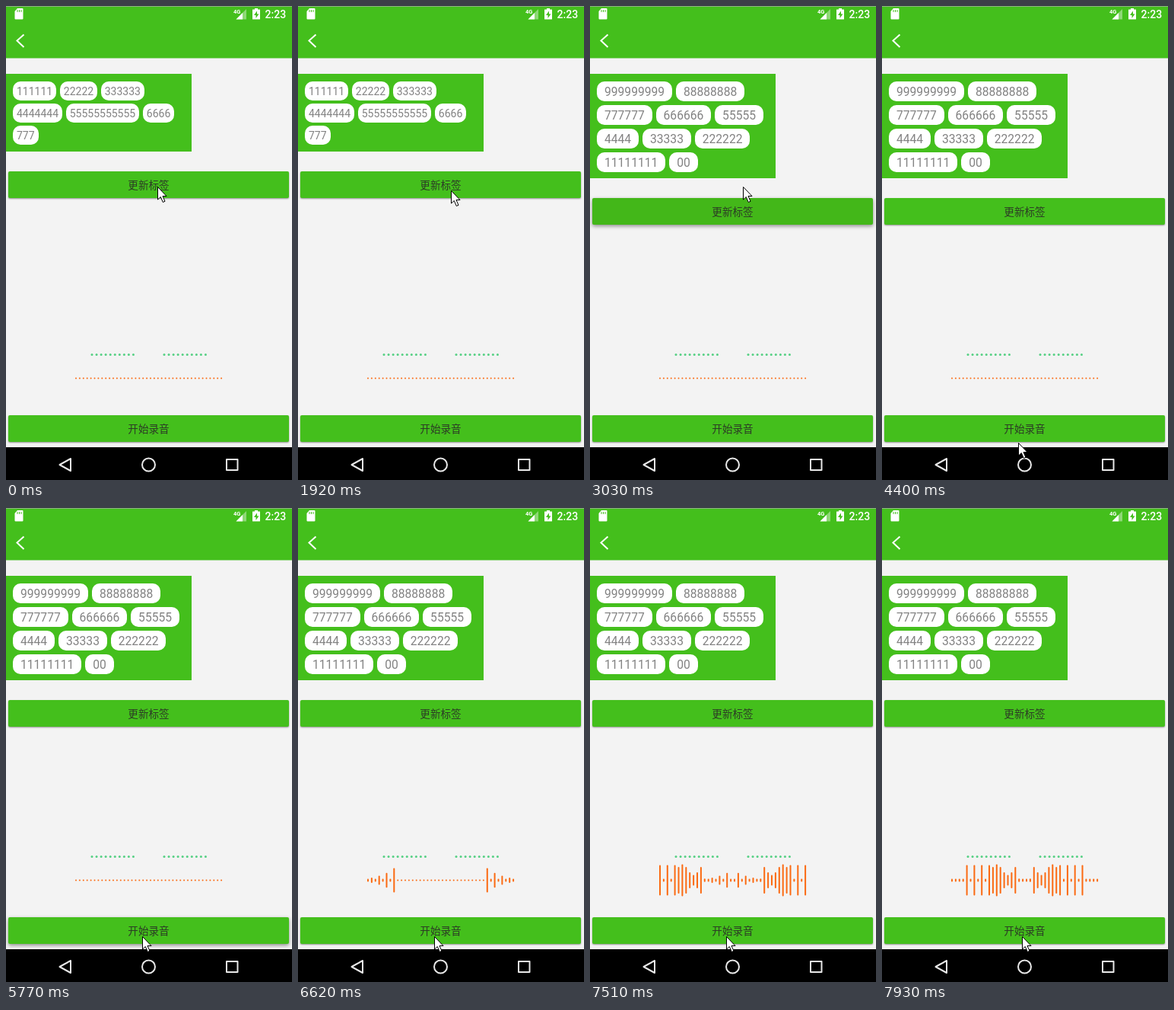
Animation, 376 px wide and 622 px high, one loop 7.99 s. Source, as an HTML page:

```html
<!DOCTYPE html>
<html lang="zh">
<head>
<meta charset="utf-8">
<style>
html, body { margin: 0; width: 100%; height: 100%; overflow: hidden; background: #f3f3f3; }
body, body > svg { position: absolute; left: 0; top: 0; }
body > * { position: absolute; box-sizing: border-box; }
.header { left: 0; top: 0; width: 376px; height: 68px; background: #44bf1c;
  border-top: 1px solid #8fb085; box-shadow: 0 1px #9bd98a; }
.tags { left: 0; top: 89px; width: 244px; display: flex; flex-wrap: wrap; align-content: flex-start;
  background: #44bf1c; font-family: Roboto, sans-serif; color: #828282; }
.tags span { background: #fff; border-radius: 10px; }
#before { height: 102px; padding: 9.6px 9px 0; gap: 4.2px 4.6px; font-size: 14px; }
#before span { padding: 1px 5px 0; line-height: 24px; }
#after { height: 137px; padding: 9.6px 9px 0; gap: 5px 4.8px; font-size: 15.65px; }
#after span { padding: 1px 10px 0; line-height: 25px; }
.button { left: 3px; width: 369px; height: 35px; border-radius: 2px; background: #44bf1c;
  box-shadow: 0 1px 2px rgba(0,0,0,.4); text-align: center; color: #2c3a26;
  font: 13.6px/34px "Noto Sans CJK SC", "Noto Sans CJK", sans-serif; }
.button.pressed { box-shadow: 0 2px 5px rgba(0,0,0,.42); }
#update.pressed { background: #43b719; }
#record { top: 537px; }
</style>
</head>
<body>
<div class="header"></div>
<div class="tags" id="before"></div>
<div class="tags" id="after"></div>
<div class="button" id="update">更新标签</div>
<div class="button" id="record">开始录音</div>
<svg width="376" height="622" fill="none">
  <g fill="#fff" font-family="Roboto, sans-serif">
    <path d="M15 3h6.500q1 0 1 1v12.500q0 1-1 1h-9q-1 0-1-1V7z"/>
    <path d="M15 5v3m2.500-3v3m2.500-3v3" stroke="#44bf1c"/>
    <text x="299" y="9.500" font-size="7.500" font-weight="700">4G</text>
    <path d="M316 4v13.500h-13.500z" opacity=".4"/>
    <path d="M311 9v8.500h-8.500z"/>
    <path d="M327 3h4v1.500h2.500q.5 0 .5.500v12q0 .5-.5.500h-9q-.5 0-.5-.500V5q0-.5.500-.500H327z"/>
    <path d="M330 6.500l-4 5.500h2.500v4l4-5.500H330z" fill="#44bf1c"/>
    <text x="340.500" y="15.500" font-size="14" font-weight="500">2:23</text>
  </g>
  <path d="M23.500 37.500L14.500 45.500l9 8.500" stroke="#fff" stroke-width="2"/>
  <g id="dots" fill="#55d083"></g>
  <g id="wave" stroke="#fb6a12" stroke-width="2" stroke-linecap="round"></g>
  <path d="M0 579h376v43H0z" fill="#000"/>
  <g stroke="#e8e8e8" stroke-width="2" stroke-linejoin="round">
    <path d="M85 594v16l-14.500-8z"/>
    <circle cx="187.500" cy="602" r="8.500"/>
    <path d="M290 595h14.500v14H290z"/>
  </g>
  <path id="cursor" d="M.5.500v16.500l3.800-3.500 3 7 2.700-1.200-3-6.800H12z" fill="#fff" stroke="#000"/>
</svg>
<script>
const LOOP = 7990, STEP = 60, BARS = 40, MID = 488.5;
const $ = id => document.getElementById(id);

// Cursor glides, each from the end of the one before
const glides = [
  { start: 500, steps: 2, x: 201, y: 249 },
  { start: 1920, steps: 3, x: 201, y: 237 },
  { start: 3390, steps: 4, x: 177, y: 596 },
  { start: 3990, steps: 2, x: 176, y: 602 },
  { start: 4110, steps: 6, x: 179, y: 572 },
  { start: 5020, steps: 2, x: 179, y: 562 },
  { start: 7880, steps: 2, x: 185, y: 562 }
];

function addTags(id, labels) {
  for (const label of labels.split(' ')) {
    const tag = document.createElement('span');
    tag.textContent = label;
    $(id).append(tag);
  }
}

function addShape(parent, type, attrs) {
  const el = document.createElementNS('http://www.w3.org/2000/svg', type);
  for (const name in attrs) el.setAttribute(name, attrs[name]);
  parent.append(el);
  return el;
}

addTags('before', '111111 22222 333333 4444444 55555555555 6666 777');
addTags('after', '999999999 88888888 777777 666666 55555 4444 33333 222222 11111111 00');

for (const left of [113, 208])
  for (let i = 0; i < 10; i++)
    addShape($('dots'), 'circle', { cx: left + i * 6.05, cy: 457.5, r: 1.5 });

const bars = Array.from({ length: BARS }, (_, i) => {
  const x = 92 + i * 4.9;
  return addShape($('wave'), 'line', { x1: x, x2: x });
});

// Half height of the nth recorded level: a fading beat, a swell, a loud beat, then quiet
function level(n) {
  const beat = n % 2 === 0;
  if (n < 0) return 1;
  if (n < 9) return beat ? 16 * Math.exp(-n / 4) : 2;
  if (n < 16) return 14 - 7 * Math.sin((n - 9.5) * Math.PI / 3);
  return beat && n < 24 ? 20 : 2;
}

// Levels enter at both outer ends and move inwards
function newestLevel(t) {
  return t < 7160
    ? Math.floor((t - 6140) / 63.75)
    : Math.min(26, 16 + Math.floor((t - 7160) / 72));
}

function cursorAt(t) {
  let x = 199, y = 237;
  for (const glide of glides) {
    if (t < glide.start) break;
    const done = Math.min(1, (Math.floor((t - glide.start) / STEP) + 1) / glide.steps);
    const eased = 1 - (1 - done) ** 2;
    x += (glide.x - x) * eased;
    y += (glide.y - y) * eased;
  }
  return [Math.round(x), Math.round(y)];
}

function draw(t) {
  const updated = t >= 2960;
  $('before').style.display = updated ? 'none' : '';
  $('after').style.display = updated ? '' : 'none';
  $('update').style.top = (updated ? 252 : 217) + 'px';
  $('update').classList.toggle('pressed', t >= 2900 && t < 3150);
  $('record').classList.toggle('pressed', t >= 5770 && t < 6140);

  const newest = newestLevel(t);
  bars.forEach((bar, i) => {
    const half = level(newest - Math.min(i, BARS - 1 - i)) - 1;
    bar.setAttribute('y1', MID - half);
    bar.setAttribute('y2', MID + half);
  });

  $('cursor').setAttribute('transform', `translate(${cursorAt(t)})`);
}

function tick() {
  draw(performance.now() % LOOP);
  requestAnimationFrame(tick);
}
tick();
</script>
</body>
</html>
```
